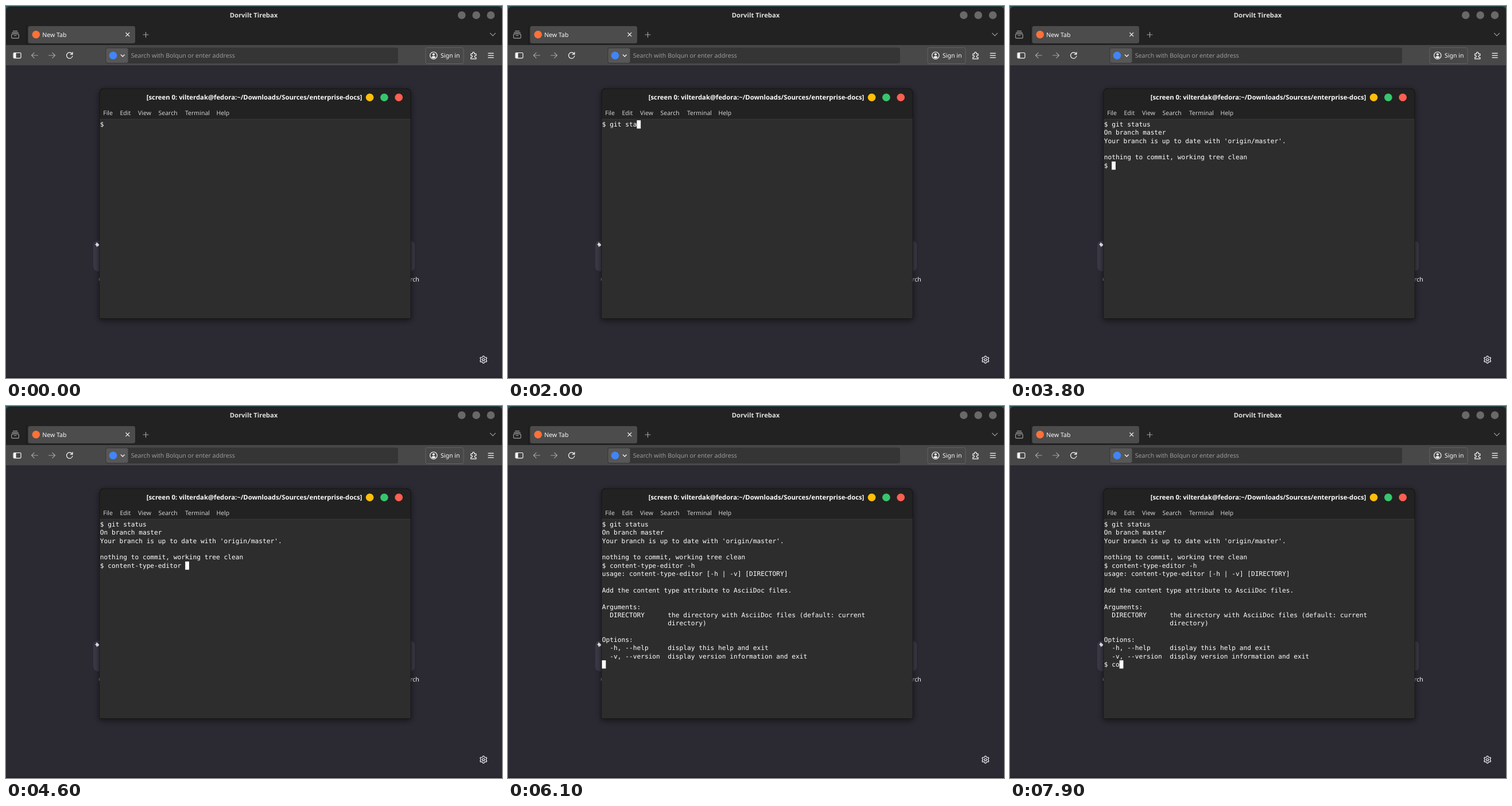
Recreate the animation shown at these times as an HTML page. Size 864 by 648 pixels, loop 8 s.

```html
<!DOCTYPE html>
<html lang="en">
<head>
<meta charset="utf-8">
<title>Terminal session</title>
<style>
  html, body { margin: 0; width: 100%; height: 100%; overflow: hidden; background: #2b2a33; }
  svg { display: block; width: 100vw; height: 100vh; }
  text { font-family: "Noto Sans", sans-serif; font-size: 10.6px; fill: #fbfbfe; text-rendering: geometricPrecision; white-space: pre; }
  .title { font-size: 11.3px; font-weight: 700; }
  .app { fill: #dedede; }
  .hint { fill: #9b9b9b; }
  .menu text { font-size: 10.5px; fill: #d2d2d2; }
  #term text { font-family: "DejaVu Sans Mono", monospace; font-size: 11.21px; fill: #fff; }
  .icon { fill: none; stroke: #fbfbfe; stroke-width: 1.2; stroke-linecap: round; stroke-linejoin: round; }
  .solid { fill: #fbfbfe; stroke: none; }
  .dim { stroke: #a2a2a2; }
</style>
</head>
<body>
<svg viewBox="0 0 864 648">
  <defs>
    <filter id="shadow" x="-10%" y="-10%" width="120%" height="125%">
      <feDropShadow dx="0" dy="3" stdDeviation="6" flood-color="#000" flood-opacity=".55"/>
    </filter>
  </defs>

  <!-- browser -->
  <rect width="864" height="20" fill="#2a5058"/>
  <path d="M0 648V9Q0 1 8 1H856Q864 1 864 9V648Z" fill="#222"/>
  <rect y="68" width="864" height="36" fill="#484848"/>
  <rect y="104" width="864" height="544" fill="#2b2a33"/>
  <rect y="103.5" width="864" height="1" fill="#252429"/>
  <rect y="646.5" width="864" height="1.5" fill="#221d26"/>
  <text class="title app" x="431.5" y="20" text-anchor="middle">Dorvilt Tirebax</text>
  <g fill="#696969">
    <circle cx="793.8" cy="16" r="6.8"/>
    <circle cx="819.2" cy="16" r="6.8"/>
    <circle cx="844.5" cy="16" r="6.8"/>
  </g>

  <!-- tab strip -->
  <rect x="35" y="33" width="1" height="35" fill="#191919"/>
  <rect x="38.5" y="35" width="186.5" height="30" rx="3.5" fill="#4c4c4c"/>
  <circle cx="52.3" cy="49.8" r="6.8" fill="#ff7139"/>
  <text x="63.2" y="53.7">New Tab</text>
  <path class="icon" d="M208.8 46.7l6 6m0-6l-6 6"/>
  <g class="icon dim">
    <path d="M239 50h9M243.5 45.5v9M843.5 47.3l4.5 4.5 4.5-4.5"/>
    <path d="M12.5 43.7h7M10.7 46.3h10.6"/>
    <rect x="9.7" y="48.7" width="12.6" height="7.5" rx="1.5"/>
    <path d="M14 51.5h4"/>
  </g>

  <!-- toolbar -->
  <g class="icon">
    <rect x="13" y="81.5" width="13" height="9.3" rx="1.5"/>
    <path class="solid" d="M13.5 82h4v8.3h-4z"/>
    <path class="dim" d="M55.5 86H44.5m4.7-4.7L44.5 86l4.7 4.7M74.5 86h11m-4.7-4.7L85.5 86l-4.7 4.7"/>
    <path d="M115.2 83.3A5.2 5.2 0 1 0 115.9 87M115.9 80.5v3.7h-3.7"/>
  </g>
  <rect x="173.5" y="72.5" width="509.5" height="27.5" rx="3.5" fill="#353535"/>
  <rect x="174.4" y="73.4" width="38.2" height="25.7" rx="3" fill="#575757"/>
  <circle cx="186.5" cy="86.2" r="6.8" fill="#4285f4"/>
  <path class="icon" d="M200.3 85l3 3 3-3"/>
  <text class="hint" x="217.7" y="90">Search with Bolqun or enter address</text>
  <rect x="731" y="72.5" width="66" height="28" rx="3" fill="none" stroke="#626262"/>
  <text x="757" y="90">Sign in</text>
  <g class="icon">
    <circle cx="744.8" cy="86.2" r="6.2"/>
    <circle class="solid" cx="744.8" cy="84.3" r="2"/>
    <path class="solid" d="M741.3 89.8q0-2.5 3.5-2.5t3.5 2.5q-3.5 2.5-7 0z"/>
    <path d="M809.8 83.3h2.7v-1q0-2 1.7-2t1.7 2v1h3v3h-1q-1.8 0-1.8 1.6t1.8 1.6h1v2.7h-9.1v-2.9h1q1.7 0 1.7-1.5t-1.7-1.5h-1z"/>
    <path d="M840 82.3h9.2M840 86.1h9.2M840 89.9h9.2"/>
  </g>

  <!-- new tab page -->
  <rect x="152" y="409" width="70" height="53" rx="8" fill="#3b3a46"/>
  <rect x="642" y="409" width="70" height="53" rx="8" fill="#3b3a46"/>
  <path class="solid" d="M157.5 411.5l5 4-1 2.5-2 .5-1.5 1.5-.5-2.5-2.5-2.5 2-.5z"/>
  <text x="161.2" y="480">C</text>
  <text x="719.8" y="480" text-anchor="end">Search</text>
  <g class="icon">
    <path id="gear"/>
    <circle cx="831.7" cy="616" r="2"/>
  </g>

  <!-- terminal window -->
  <path d="M162.5 545V152Q162.5 143.5 171 143.5H697Q705.5 143.5 705.5 152V545Z" fill="#0e0e0e" filter="url(#shadow)"/>
  <path d="M163.3 544.2V152Q163.3 144.3 171 144.3H697Q704.6 144.3 704.6 152V544.2Z" fill="#222"/>
  <rect x="163.3" y="197" width="541.3" height="347.2" fill="#2d2d2d"/>
  <rect x="163.3" y="196.8" width="541.3" height="1" fill="#383838"/>
  <text class="title" x="620.3" y="163.3" text-anchor="end">[screen 0: vilterdak@fedora:~/Downloads/Sources/enterprise-docs]</text>
  <circle cx="633.6" cy="159.3" r="6.8" fill="#ffbf0b"/>
  <circle cx="658.9" cy="159.3" r="6.8" fill="#36c76d"/>
  <circle cx="684.2" cy="159.3" r="6.8" fill="#ff5f52"/>
  <g class="menu">
    <text x="169.2" y="190">File</text>
    <text x="198.4" y="190">Edit</text>
    <text x="230" y="190">View</text>
    <text x="265.5" y="190">Search</text>
    <text x="312" y="190">Terminal</text>
    <text x="366.4" y="190">Help</text>
  </g>
  <g id="term"></g>
</svg>

<script>
const LOOP = 8000, CELL = 6.75, ROW = 14.344, LEFT = 163.69, TOP = 199.13, BASELINE = 10.97;
const tool = 'content-type-editor';
const log = `$ git status
On branch master
Your branch is up to date with 'origin/master'.

nothing to commit, working tree clean
$ ${tool} -h
usage: ${tool} [-h | -v] [DIRECTORY]

Add the content type attribute to AsciiDoc files.

Arguments:
  DIRECTORY      the directory with AsciiDoc files (default: current
                 directory)

Options:
  -h, --help     display this help and exit
  -v, --version  display version information and exit`.split('\n');

// Each state: start time, finished rows, current line, cursor visible
const states = [];
const at = (time, rows, line, cursor = true) => states.push({ time, rows, line, cursor });
const type = (time, rows, line, keys) =>
  [...keys].forEach((_, i) => at(time + i * 100, rows, line + keys.slice(0, i + 1)));

at(0, 0, '$ ', false);
at(400, 0, '$ ');
at(1000, 0, '$ ', false);
type(1300, 0, '$ ', 'git ');
type(1800, 0, '$ git ', 'statu');
at(2400, 0, '$ git status');
at(2600, 5, '$ ');
at(3200, 5, '$ ', false);
at(3800, 5, '$ ');
type(4100, 5, '$ ', 'conte');
at(4600, 5, `$ ${tool} `);
at(5200, 5, `$ ${tool} `, false);
at(5300, 5, `$ ${tool} -`);
at(5500, 5, `$ ${tool} -h`);
at(5800, 6, '');
at(6100, 17, '');
at(6200, 17, '$ ');
at(6400, 17, '$ ', false);
at(7000, 17, '$ ');
at(7600, 17, '$ ', false);
at(7900, 17, '$ co');

const term = document.getElementById('term');
const make = (tag, attrs) => {
  const el = document.createElementNS('http://www.w3.org/2000/svg', tag);
  for (const key in attrs) el.setAttribute(key, attrs[key]);
  return term.appendChild(el);
};
const rows = Array.from({ length: log.length + 1 }, (_, i) =>
  make('text', { x: LEFT, y: TOP + BASELINE + i * ROW }));
const cursor = make('rect', { width: CELL, height: ROW, fill: '#fff' });

// Six-toothed cog with one tooth pointing up
const teeth = Array.from({ length: 24 }, (_, i) => {
  const a = (i - 0.5) * Math.PI / 12 - Math.PI / 2, r = i % 4 < 2 ? 6.3 : 4.7;
  return `${(831.7 + r * Math.cos(a)).toFixed(2)} ${(616 + r * Math.sin(a)).toFixed(2)}`;
});
document.getElementById('gear').setAttribute('d', `M${teeth.join('L')}Z`);

let shown;
function draw(time) {
  const state = states.findLast(s => s.time <= time);
  if (state === shown) return;
  shown = state;
  rows.forEach((row, i) => {
    row.textContent = i < state.rows ? log[i] : i === state.rows ? state.line : '';
  });
  cursor.setAttribute('x', LEFT + state.line.length * CELL);
  cursor.setAttribute('y', TOP + state.rows * ROW);
  cursor.setAttribute('visibility', state.cursor ? 'visible' : 'hidden');
}

const start = performance.now();
function tick() {
  draw((performance.now() - start) % LOOP);
  requestAnimationFrame(tick);
}
tick();
</script>
</body>
</html>
```
